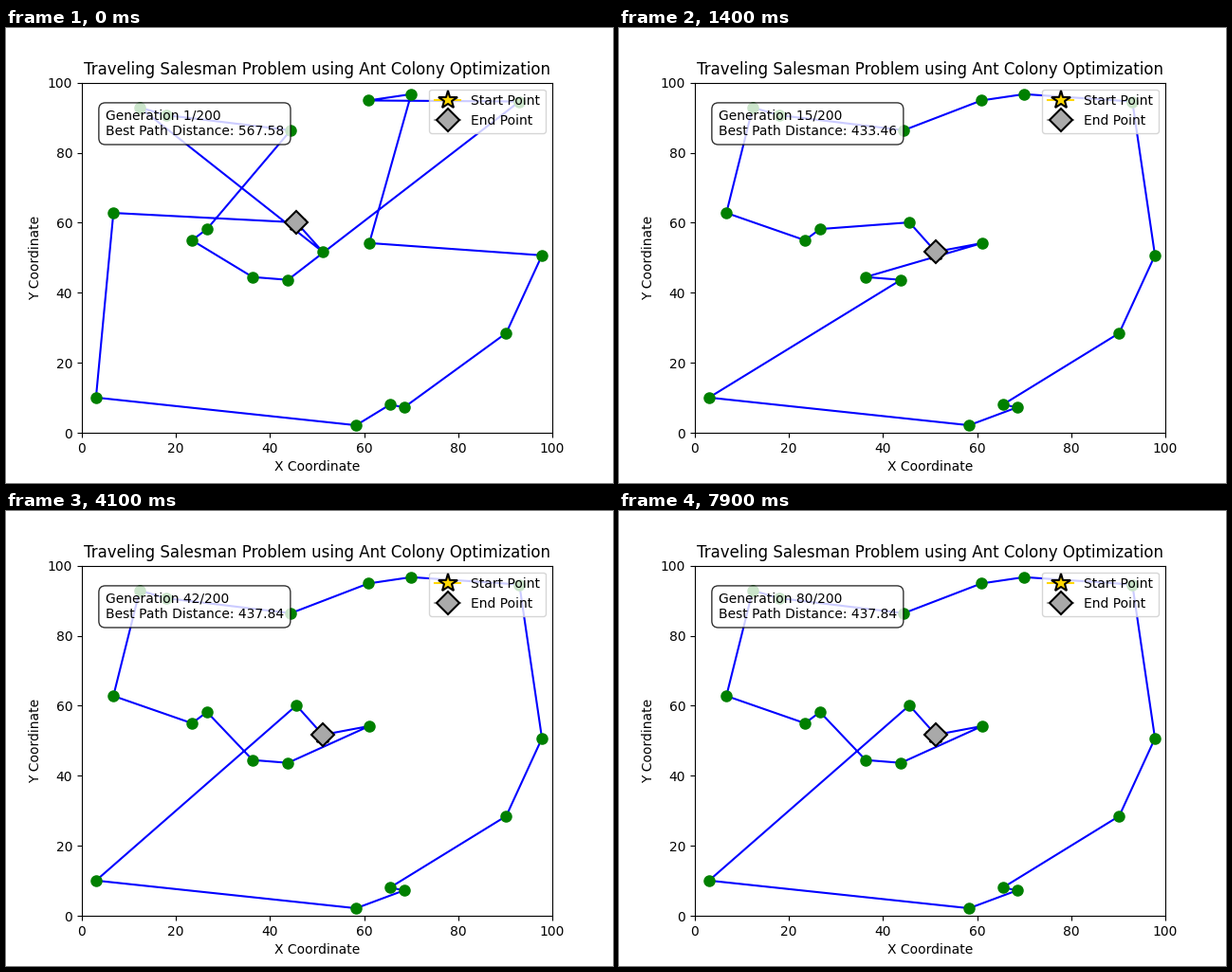
Animation, 640 px wide and 480 px high, one loop 8 s. Source, as a matplotlib script:

```python
import matplotlib.pyplot as plt
from matplotlib.animation import FuncAnimation

FRAMES, INTERVAL, GENERATIONS = 80, 100, 200

CITIES = {
    "A": (12.3, 92.9), "B": (17.9, 90.7), "C": (44.4, 86.4), "D": (45.6, 60.1),
    "E": (6.7, 62.8), "F": (23.4, 55.0), "G": (26.6, 58.2), "H": (36.3, 44.5),
    "I": (43.8, 43.7), "J": (51.2, 51.7), "K": (61.1, 54.2), "L": (60.9, 94.9),
    "M": (70.0, 96.7), "N": (93.0, 94.6), "O": (97.8, 50.7), "P": (90.2, 28.5),
    "Q": (65.5, 8.1), "R": (68.5, 7.3), "S": (58.3, 2.2), "T": (3.0, 10.1),
}

# Closed tours with their lengths
FIRST = ("DETSQRPOKMLNIHFGCBAJ", 567.58)
LOOSE = ("OPRQSTEABCGFHIJDKLMN", 455.12)
DEEP = ("MLKJDCBAEFGHITSQRPON", 449.53)
INNER = ("TSRQPONMLCDKJIHGFBAE", 439.41)
RING = ("ABFGHIKJDCLMNOPQRSTE", 442.29)
SHORT = ("JDGFEABCLMNOPQRSTIHK", 433.46)
NEAR = ("BAEFGHIJKDTSRQPONMLC", 435.02)
FINAL = ("JDTSRQPONMLCBAEFGHIK", 437.84)

# (first generation, start and end city, tour)
SCHEDULE = [
    (1, "D", FIRST), (2, "O", LOOSE), (3, "M", DEEP), (4, "T", INNER),
    (6, "O", RING), (7, "A", RING), (9, "D", RING), (11, "T", INNER),
    (12, "B", NEAR), (13, "K", SHORT), (15, "J", SHORT), (18, "K", NEAR),
    (20, "E", SHORT), (21, "A", FINAL), (23, "K", FINAL), (24, "J", FINAL),
]

fig, ax = plt.subplots(figsize=(6.4, 4.8), dpi=100)
ax.set(xlim=(0, 100), ylim=(0, 100),
       xlabel="X Coordinate", ylabel="Y Coordinate",
       title="Traveling Salesman Problem using Ant Colony Optimization")

path, = ax.plot([], [], color="blue")
ax.plot(*zip(*CITIES.values()), "o", color="green", markersize=8)


def end_marker(shape, size, color, label):
    line, = ax.plot([], [], marker=shape, markersize=size, color=color,
                    markeredgecolor="black", markeredgewidth=1.5, label=label)
    return line


start = end_marker("*", 15, "gold", "Start Point")
end = end_marker("D", 12, "darkgray", "End Point")
info = ax.text(5, 85, "", fontsize=10,
               bbox=dict(boxstyle="round,pad=0.5", facecolor="white",
                         edgecolor="black", alpha=0.8))
ax.legend(loc="upper right")


def update(frame):
    gen = frame + 1
    _, city, (tour, length) = [s for s in SCHEDULE if s[0] <= gen][-1]
    i = tour.index(city)
    loop = tour[i:] + tour[:i] + city
    path.set_data(*zip(*(CITIES[c] for c in loop)))
    x, y = CITIES[city]
    start.set_data([x], [y])
    end.set_data([x], [y])
    info.set_text(f"Generation {gen}/{GENERATIONS}\n"
                  f"Best Path Distance: {length:.2f}")
    return path, start, end, info


anim = FuncAnimation(fig, update, frames=FRAMES, interval=INTERVAL,
                     repeat=True, repeat_delay=0)
plt.show()
```
